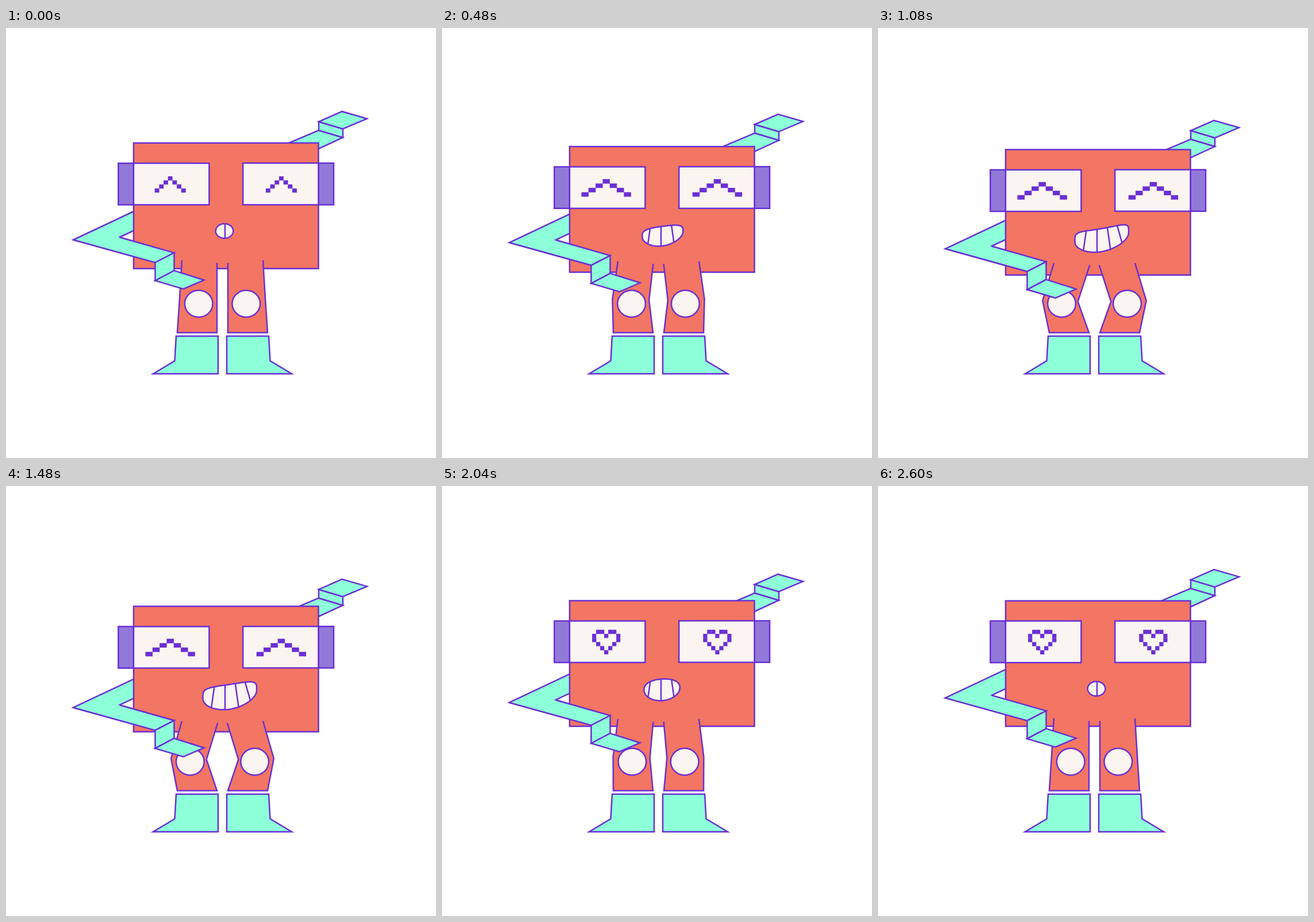
An HTML page with a canvas that plays this animation: 748 px wide and 748 px high, repeating every 2.64 s.

```html
<!DOCTYPE html>
<html lang="en">
<head>
<meta charset="utf-8">
<title>Squatting robot</title>
<style>
html, body { margin: 0; height: 100%; overflow: hidden; background: #fff; }
canvas { display: block; width: 748px; height: 748px; }
</style>
</head>
<body>
<canvas width="748" height="748"></canvas>
<script>
const ctx = document.querySelector('canvas').getContext('2d');
const LOOP = 2640, STEP = 40, AXIS = 376.5;
const LINE = '#6a2fd4', CORAL = '#f37563', MINT = '#8dffd9', CREAM = '#fbf5f1', VIOLET = '#9279d8';

const mix = (a, b, p) => a + (b - a) * p;
const ease = p => (1 - Math.cos(Math.PI * Math.min(1, Math.max(0, p)))) / 2;
// Eases from 0 to 1 in `rise` ms, then back to 0 in `fall` ms, starting at `turn`.
const pulse = (t, rise, turn, fall) => ease(t / rise) - ease((t - turn) / fall);

function bounce(t) {
  const a = t / LOOP * 2 * Math.PI;
  return 4.95 - 5.4 * Math.cos(a) + 4 * Math.sin(a) + .55 * Math.cos(2 * a) + .5 * Math.sin(2 * a);
}

function shape(fill, points, open) {
  ctx.beginPath();
  points.forEach(([x, y]) => ctx.lineTo(x, y));
  if (!open) ctx.closePath();
  ctx.fillStyle = fill;
  ctx.fill();
  ctx.stroke();
}

function box(fill, x, y, w, h) {
  shape(fill, [[x, y], [x + w, y], [x + w, y + h], [x, y + h]]);
}

function shifted(dy, draw) {
  ctx.save();
  ctx.translate(0, dy);
  draw();
  ctx.restore();
}

function backArms() {
  const fold = [[544, 163], [586, 175.5]], bend = [[586, 190.5], [544, 178]];
  shape(MINT, [...bend, [470, 209.3], [480, 239.5]]);
  shape(MINT, [...fold, ...bend]);
  shape(MINT, [...fold, [628, 157.7], [584.5, 145.2]]);
  shape(MINT, [[117, 368.5], [240, 310.5], [240, 344], [197.5, 364], [292.5, 391], [259.5, 408]]);
}

function frontArm() {
  const fold = [[292.5, 391], [259.5, 408]], bend = [[259.5, 439.5], [292.5, 422]];
  shape(MINT, [[197.5, 364], ...fold, [117, 368.5]], true);
  shape(MINT, [...fold, ...bend]);
  shape(MINT, [...bend, [344.5, 438.5], [308.5, 454]]);
}

function eye(cx, t) {
  const heart = t >= 2000;
  const wide = pulse(t + 40, 260, 1880, 160);
  const w = heart ? 7 : mix(7.4, 12.3, wide), h = heart ? 7.1 : mix(7, 7.6, wide);
  const top = heart ? 250.5 : mix(258, 256.5, wide);
  ctx.fillStyle = LINE;
  for (let i = -3; i <= 3; i++) {
    const d = Math.abs(i);
    const pixel = row => ctx.fillRect(cx + (i - .5) * w, top + row * h, w + .2, h + .2);
    pixel(heart ? 5 - d : d);
    if (heart) pixel(d % 3 ? 0 : 1);
  }
}

// A bent superellipse: a small "o" that opens into a lopsided grin.
function mouth(t) {
  const open = pulse(t, 860, 1500, 1020), bend = pulse(t, 860, 1200, 1250);
  const left = mix(364.7, 342.5, 1 - (1 - open) ** 1.5), right = mix(395.3, 436, open);
  const half = mix(12.7, 20, open) + 13 * (open - bend);
  const outline = new Path2D();
  for (let i = 0; i < 160; i++) {
    const a = i / 80 * Math.PI, u = Math.cos(a), s = Math.sin(a);
    const middle = mix(353, 357.5, open) - bend * (8 * u + 8.5 * u * u);
    outline.lineTo(mix(left, right, (u + 1) / 2),
      middle + half * Math.sign(s) * Math.abs(s) ** mix(1, .6, bend));
  }
  outline.closePath();
  ctx.fillStyle = CREAM;
  ctx.fill(outline);
  ctx.save();
  ctx.clip(outline);
  ctx.beginPath();
  for (let i = -1; i <= 2; i++) {
    ctx.moveTo(381 + 16.5 * i, 325);
    ctx.lineTo(381 + 25 * i, 385);
  }
  ctx.stroke();
  ctx.restore();
  ctx.stroke(outline);
}

function head(t) {
  box(CORAL, 222, 200, 321.5, 218.4);
  box(VIOLET, 195.4, 235.2, 26.6, 72.3);
  box(VIOLET, 543.5, 235, 26.5, 72.3);
  box(CREAM, 222, 235.2, 131.4, 72.3);
  box(CREAM, 412.2, 235, 131.3, 72.3);
  eye(285.6, t);
  eye(478.8, t);
  mouth(t);
}

function leg(k, side) {
  const at = (x, y) => [AXIS + side * x, y];
  shape(CORAL, [
    at(70.5, 404 + .32 * k), at(74.5 + k, 470 + .27 * k), at(78.5, 530),
    at(9.5, 530), at(9.5 + 1.23 * k, 472 + .25 * k), at(9.5 - .08 * k, 408.8 + .23 * k)
  ], true);
  ctx.beginPath();
  ctx.ellipse(...at(41.3 + k, 479.6), 24.4, 23.4, 0, 0, 7);
  ctx.fillStyle = CREAM;
  ctx.fill();
  ctx.stroke();
  shape(MINT, [at(80.5, 536), at(7.5, 536), at(7.5, 601.5), at(120.5, 601.5), at(83, 579)]);
}

function draw(now) {
  const t = Math.floor(now % LOOP / STEP) * STEP;
  const arm = 17.3 * pulse(t, 1360, 1360, 1320), knee = 16.1 * pulse(t, 1200, 1270, 1180);
  ctx.fillStyle = '#fff';
  ctx.fillRect(0, 0, 748, 748);
  ctx.strokeStyle = LINE;
  ctx.lineWidth = 2.5;
  shifted(arm, backArms);
  shifted(bounce(t), () => head(t));
  leg(knee, -1);
  leg(knee, 1);
  shifted(arm, frontArm);
}

const start = performance.now();
function tick() {
  draw(performance.now() - start);
  requestAnimationFrame(tick);
}
tick();
</script>
</body>
</html>
```
